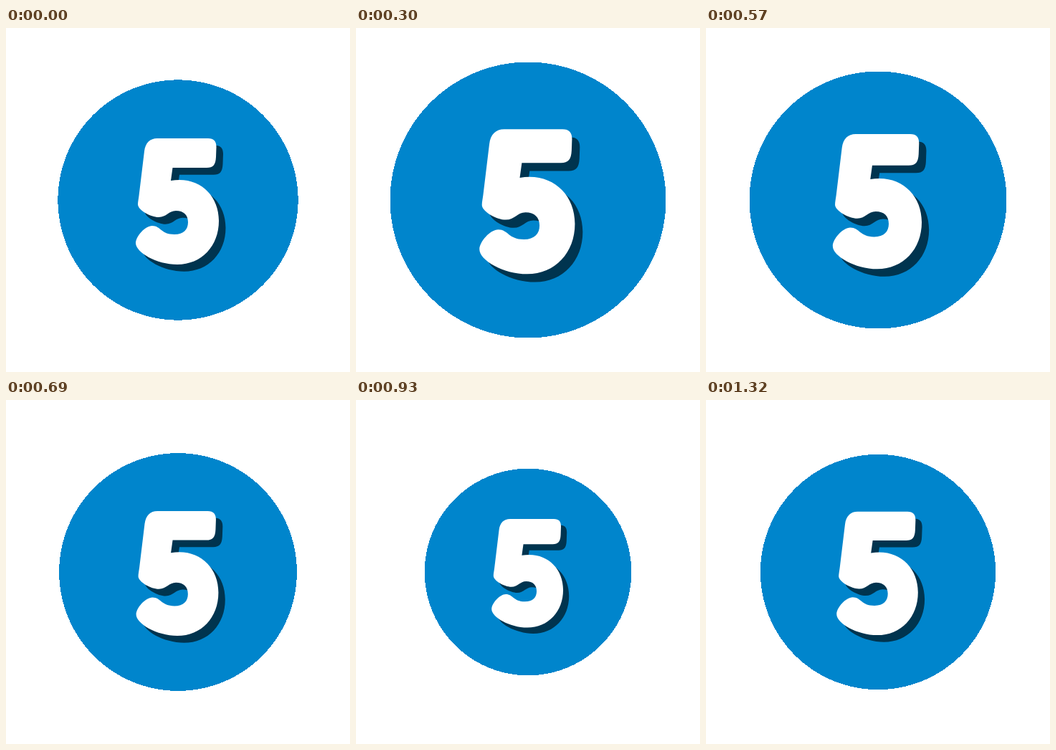
Write an HTML page with a canvas that moves like this. It is 480 by 480 pixels and loops after 1.35 s.

```html
<!DOCTYPE html>
<html lang="en">
<head>
<meta charset="utf-8">
<title>Pulsing five</title>
<style>
  html, body { margin: 0; width: 100%; height: 100%; overflow: hidden; background: #fff; }
  canvas { display: block; width: 480px; height: 480px; }
</style>
</head>
<body>
<canvas id="stage" width="480" height="480"></canvas>
<script>
const ctx = document.getElementById('stage').getContext('2d');
const SIZE = 480, CENTER = 240;
const LOOP = 1350, STEP = 30;
const RADIUS = 167.6, SWING = 25.2;

// The digit, relative to the stage centre at scale 1.
const five = new Path2D(`
  M -29 -86 L 42 -86
  C 50 -86 53.5 -82 53.5 -74
  L 53 -60 C 52.5 -49 49 -45 40 -45
  L -7.5 -45 L -10 -27
  C -6 -27.6 -2 -28 2 -28
  C 34 -28 57 -4 57 29
  C 57 64 33 90 -1 90
  C -30 90 -59 73 -59 60
  C -59 51 -46 36 -36 36
  C -24 36 -24 48 -5 48
  C 8 48 14 41 14 31
  C 14 21 8 15 -3 15
  C -13 15 -16 24 -27 24
  C -38 24 -56 14 -56 6
  C -56 3 -55 -2 -54.5 -6
  L -47 -68 C -45.5 -80 -39 -86 -29 -86 Z`);

// Filled row by row to keep a hard, unsmoothed rim.
function crispDisc(radius, color) {
  ctx.fillStyle = color;
  for (let y = 0; y < SIZE; y++) {
    const dy = y + 0.5 - CENTER;
    if (Math.abs(dy) >= radius) continue;
    const half = Math.round(Math.sqrt(radius * radius - dy * dy));
    ctx.fillRect(CENTER - half, y, 2 * half, 1);
  }
}

function digit(scale, dx, dy, color) {
  ctx.save();
  ctx.translate(CENTER, CENTER);
  ctx.scale(scale, scale);
  ctx.translate(dx, dy);
  ctx.fillStyle = color;
  ctx.fill(five);
  ctx.restore();
}

function draw(now) {
  const time = Math.floor((now % LOOP) / STEP) * STEP;
  const radius = RADIUS + SWING * Math.sin(2 * Math.PI * time / LOOP);
  const scale = radius / RADIUS;
  ctx.fillStyle = '#fff';
  ctx.fillRect(0, 0, SIZE, SIZE);
  crispDisc(radius, '#0085cc');
  digit(scale, 9.5, 9.8, '#00344f');
  digit(scale, 0, 0, '#fff');
}

let start;
function tick(now) {
  start ??= now;
  draw(now - start);
  requestAnimationFrame(tick);
}
draw(0);
requestAnimationFrame(tick);
</script>
</body>
</html>
```
